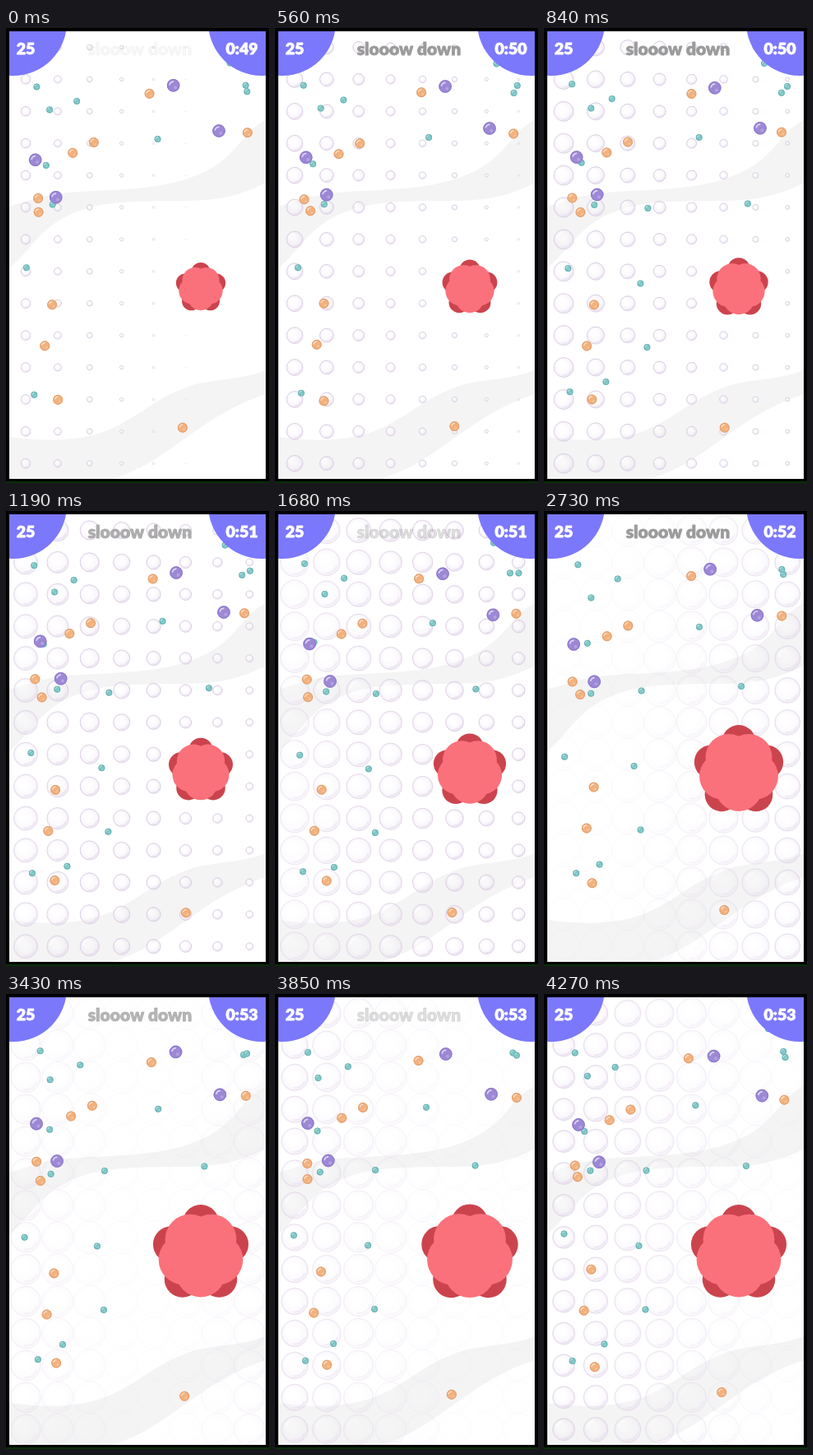
Animation, 320 px wide and 553 px high, one loop 4340 ms. Source, as an HTML page with a canvas:

```html
<!DOCTYPE html>
<html lang="en">
<head>
<meta charset="utf-8">
<title>Slow down</title>
<style>
  html, body { margin: 0; width: 100%; height: 100%; overflow: hidden; background: #000; }
  canvas { display: block; width: 320px; height: 553px; }
</style>
</head>
<body>
<canvas id="stage" width="320" height="553"></canvas>
<script>
const ctx = document.getElementById('stage').getContext('2d');
const LOOP = 4340, STEP = 70, TAU = Math.PI * 2;
const rad = deg => deg * Math.PI / 180;
const clamp = v => Math.max(0, Math.min(1, v));
const swell = deg => (1 - Math.cos(rad(deg))) / 2;

// Each kind circles around its home points: [x, y, start angle]
const kinds = [
  { r: 4, orbit: 4, period: LOOP, fill: '#7fc6c6', rim: '#62acaf', homes: [
    [38, 67.5, 100], [56.5, 101.5, 212], [86.5, 85, 95], [49.5, 163, 100], [58.5, 218, 243],
    [26.5, 295, 245], [35.5, 442, 108], [188, 137, 210], [293, 73.5, 250], [290, 75, 35],
    [270, 39.5, 50] ] },
  { r: 4, orbit: 4, period: LOOP, fill: '#7fc6c6', rim: '#62acaf', from: 840, homes: [
    [122.5, 218, 305], [113.5, 309.5, 305], [121.5, 387, 305], [71.5, 429, 305], [244, 212.5, 305] ] },
  { r: 6, orbit: 2.5, period: 2000, fill: '#f2b17d', rim: '#dc9a6c', homes: [
    [177, 80.5, 195], [291.5, 126.3, 20], [104.5, 138.2, 20], [78.8, 151, 20], [36.8, 206.2, 20],
    [42, 224.5, 195], [58.5, 337, 195], [49.7, 387, 195], [60.8, 451, 20], [217.3, 486.3, 195] ] },
  { r: 7.8, orbit: 3.3, period: 2985, fill: '#9d88d6', rim: '#8470c4', homes: [
    [204.5, 73, 255], [262.3, 125, 180], [39, 160.3, 180], [64, 205.7, 180] ] }
];

const bands = [
  'M4 217C35 208 50 202 75 200C130 195 205 200 255 167C285 147 290 125 316 112V188C270 212 235 210 190 210C140 211 110 212 75 228C40 245 30 270 4 292Z',
  'M4 497C50 503 95 503 130 486C165 470 185 447 230 433C260 426 290 427 316 416V445C270 460 240 483 205 508C180 525 165 536 130 548H4Z'
].map(d => new Path2D(d));

function disc(x, y, r, fill) {
  ctx.fillStyle = fill;
  ctx.beginPath();
  ctx.arc(x, y, r, 0, TAU);
  ctx.fill();
}

function arc(x, y, r, from, to, color, width) {
  ctx.strokeStyle = color;
  ctx.lineWidth = width;
  ctx.beginPath();
  ctx.arc(x, y, r, rad(from), rad(to));
  ctx.stroke();
}

function bubble(x, y, r, alpha) {
  ctx.globalAlpha = alpha;
  const g = ctx.createRadialGradient(x - r * .2, y - r * .2, r * .35, x, y, r);
  g.addColorStop(0, 'rgba(255,255,255,.5)');
  g.addColorStop(.75, 'rgba(240,232,245,.45)');
  g.addColorStop(1, 'rgba(212,196,222,.6)');
  disc(x, y, r, g);
  arc(x, y, r, 0, 360, '#dccfe2', Math.min(1, r * .4));
  if (r > 3) {
    arc(x, y, r * .72, 190, 260, '#fff', r * .16);
    arc(x, y, r * .8, 20, 100, '#e6daf0', r * .1);
  }
  ctx.globalAlpha = 1;
}

function grid(t) {
  for (let col = 0; col < 8; col++) {
    const size = swell(65 + .0434 * t - 8.7 * col);
    const alpha = 1.04 - size ** 3;
    for (let row = 0; row < 14; row++)
      bubble(24 + col * 38.9, 23.5 + row * 38.9, Math.max(.3, size * 20), clamp(alpha));
  }
}

function dots(t) {
  for (const { r, orbit, period, fill, rim, from = 0, homes } of kinds) {
    if (t < from) continue;
    for (const [hx, hy, start] of homes) {
      const a = rad(start) + TAU * t / period;
      const x = hx + orbit * Math.cos(a), y = hy + orbit * Math.sin(a);
      disc(x, y, r, fill);
      arc(x, y, r - .5, 0, 360, rim, .8);
      arc(x, y, r * .6, 185, 275, 'rgba(255,255,255,.65)', r * .22);
      disc(x + r * .3, y + r * .35, r * .25, 'rgba(255,255,255,.22)');
    }
  }
}

function petals(dist, r, start, fill) {
  for (let i = 0; i < 5; i++) {
    const a = rad(start + 72 * i);
    disc(dist * Math.cos(a), dist * Math.sin(a), r, fill);
  }
}

function flower(t) {
  const s = .5 + .51 * swell(22 + .041 * t);
  ctx.save();
  ctx.translate(237, 316);
  ctx.scale(s, s);
  petals(38, 22, -90, '#cb444d');
  petals(22, 30.5, 90, '#fb717b');
  ctx.restore();
}

function label(text, x, y, size, color) {
  ctx.font = `900 ${size}px Lato, sans-serif`;
  ctx.textAlign = 'center';
  ctx.lineJoin = 'round';
  ctx.lineWidth = .8;
  ctx.fillStyle = ctx.strokeStyle = color;
  ctx.fillText(text, x, y);
  ctx.strokeText(text, x, y);
}

function title(t) {
  const p = t / 2170 % 1;
  ctx.globalAlpha = clamp(Math.min(.08 + p * 4, (.92 - p) / .47));
  label('slooow down', 163, 33, 21, '#9b9b9b');
  ctx.globalAlpha = 1;
}

function corners(t) {
  disc(9, -7, 65, '#7b78fb');
  disc(311, -7, 65, '#7b78fb');
  label('25', 24, 32, 19.5, '#fff');
  label('0:' + (50 + Math.floor((t - 45) / 1060)), 287, 32, 19.5, '#fff');
}

function draw() {
  const t = Math.floor(performance.now() % LOOP / STEP) * STEP;
  ctx.fillStyle = '#000';
  ctx.fillRect(0, 0, 320, 553);
  ctx.fillStyle = '#063006';
  ctx.fillRect(0, 551, 320, 2);
  ctx.save();
  ctx.beginPath();
  ctx.rect(4, 4, 312, 544);
  ctx.clip();
  ctx.fillStyle = '#fff';
  ctx.fillRect(4, 4, 312, 544);
  ctx.fillStyle = '#f4f4f4';
  bands.forEach(b => ctx.fill(b));
  grid(t);
  title(t);
  dots(t);
  flower(t);
  corners(t);
  ctx.restore();
  requestAnimationFrame(draw);
}
draw();
</script>
</body>
</html>
```
